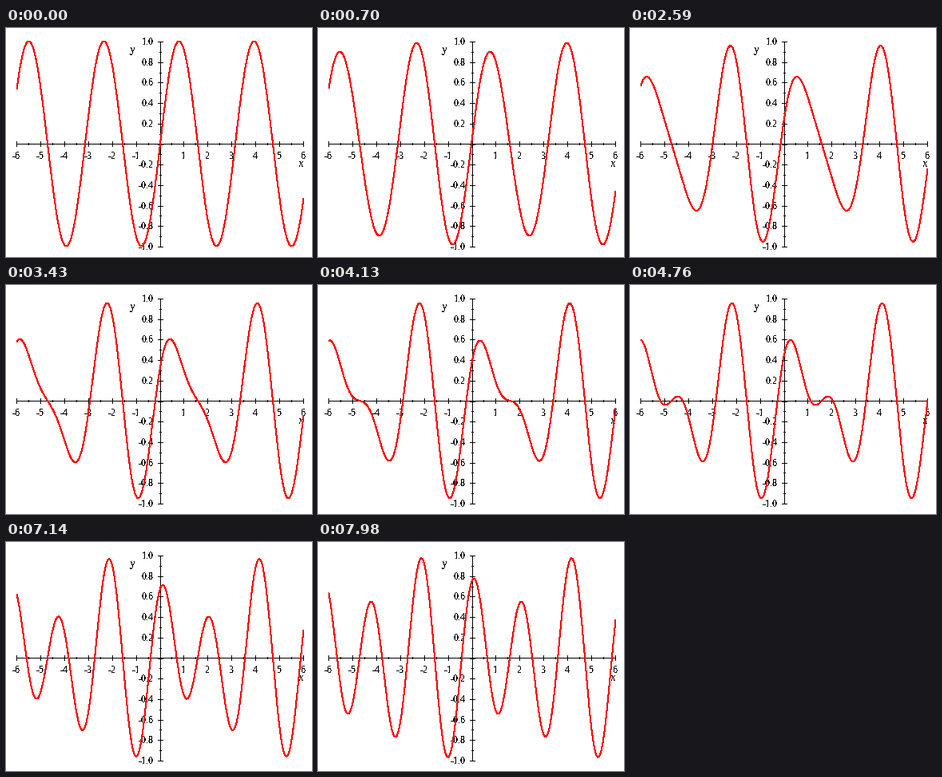
Recreate the animation shown at these times as a matplotlib script. Size 383 px wide and 287 px high, loop 8000 ms.

```python
import numpy as np
import matplotlib.pyplot as plt
from matplotlib.animation import FuncAnimation

W, H, DPI = 383, 287, 64
PX = 72 / DPI                      # one pixel in points
LOOP, INTERVAL = 8000, 20
LEFT, RIGHT, TOP, BOTTOM = 13.5, 372.5, 17.5, 274.5
X_MID, Y_MID = (LEFT + RIGHT) / 2, (TOP + BOTTOM) / 2
X_UNIT, Y_UNIT = (RIGHT - LEFT) / 12, (BOTTOM - TOP) / 2
X_AXIS, Y_AXIS = 145.5, 193.5      # row and column of the axis lines
LAST_STEP = 49

plt.rcParams.update({
    "font.family": "Liberation Serif",
    "text.antialiased": False,
    "text.hinting": "native",
    "text.hinting_factor": 1,
})

fig = plt.figure(figsize=(W / DPI, H / DPI), dpi=DPI, facecolor="white")
ax = fig.add_axes([0, 0, 1, 1])
ax.set_xlim(0, W)
ax.set_ylim(H, 0)
ax.axis("off")


def to_x(x):
    return X_MID + x * X_UNIT


def to_y(y):
    return Y_MID - y * Y_UNIT


def pixel(v):
    return np.floor(v) + 0.5


def segment(xs, ys):
    # Slightly under a pixel wide, so that it fills exactly one row or column.
    ax.plot(xs, ys, color="black", lw=0.8 * PX, antialiased=False,
            snap=False, solid_capstyle="projecting")


def label(x, y, text, size=12, ha="center"):
    ax.text(x, y, text, fontsize=size * PX, ha=ha, va="baseline")


def tick_size(i):
    return 1 if i % 2 else 3


def draw_axes():
    segment([LEFT, RIGHT], [X_AXIS, X_AXIS])
    segment([Y_AXIS, Y_AXIS], [TOP, BOTTOM])
    for i in range(-12, 13):
        x, size = pixel(to_x(i / 2)), tick_size(i)
        segment([x, x], [X_AXIS - size, X_AXIS + size])
        if i and i % 2 == 0:
            label(x - 0.5, 164, str(i // 2))
    for i in range(-10, 11):
        y, size = pixel(to_y(i / 10)), tick_size(i)
        segment([Y_AXIS - size, Y_AXIS + size], [y, y])
        if i and i % 2 == 0:
            label(185, y + 3.5, f"{i / 10:.1f}", ha="right")
    label(369, 174, "x", 15)
    label(158, 31, "y", 15)


def step_at(ms):
    """Steps last 210 ms; every sixteenth is held 70 ms longer."""
    cycle, rest = divmod(ms, 3430)
    return 16 * cycle + max(0, (rest - 70) // 210)


draw_axes()
xs = np.linspace(-6, 6, 241)
# Without antialiasing every touched pixel is filled: this looks two pixels wide.
curve, = ax.plot([], [], color="#ff0000", lw=PX, antialiased=False,
                 snap=False, solid_capstyle="butt", solid_joinstyle="round",
                 zorder=5)


def update(frame):
    mix = step_at(frame * INTERVAL + INTERVAL // 2) / LAST_STEP
    ys = (1 - mix) * np.sin(2 * xs) + mix * np.cos(3 * xs)
    curve.set_data(to_x(xs), to_y(ys) - 1)
    return curve,


anim = FuncAnimation(fig, update, frames=LOOP // INTERVAL, interval=INTERVAL,
                     repeat=True, repeat_delay=0, blit=False)
plt.show()
```
